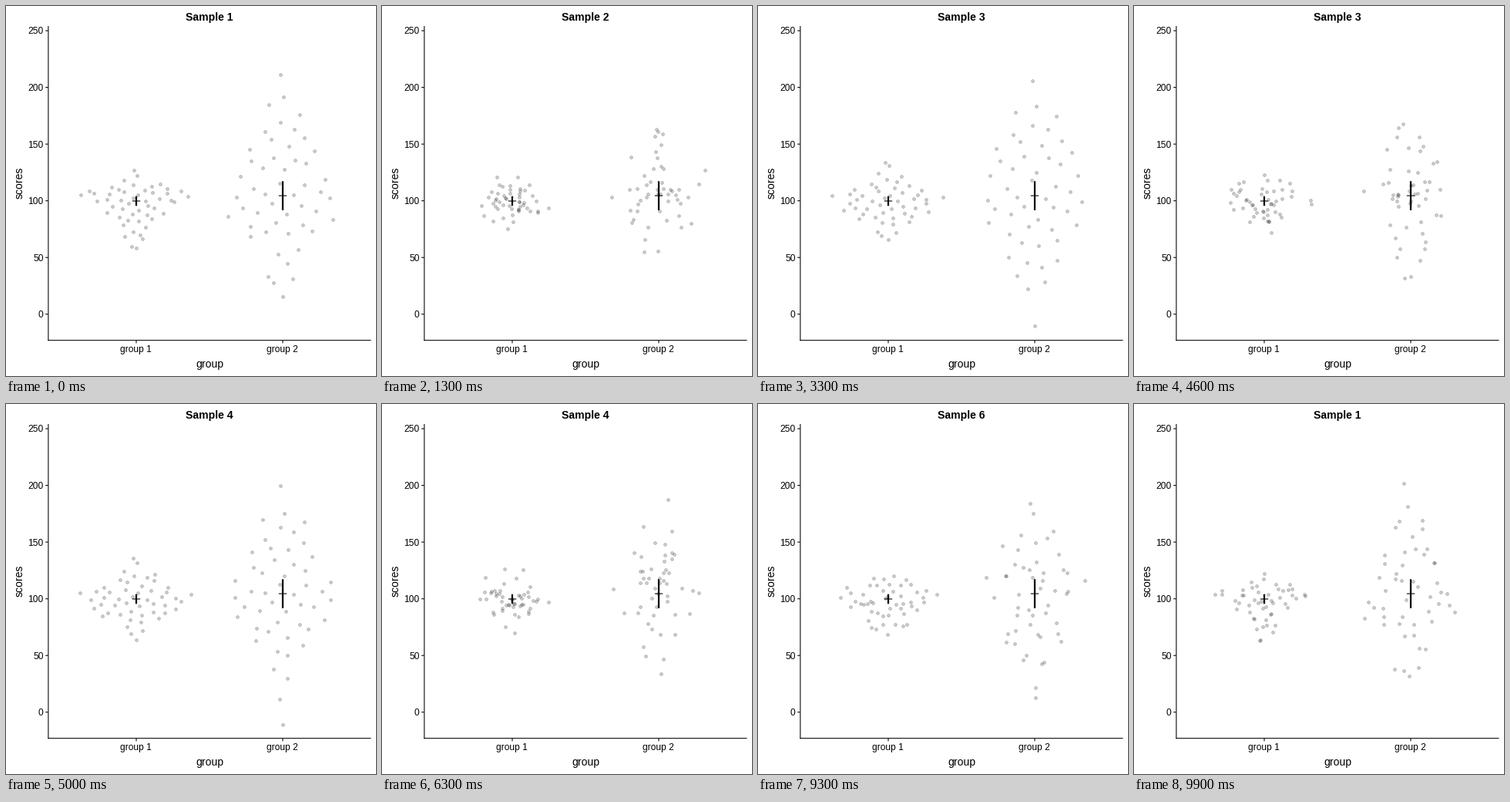
Write a matplotlib script that moves like this. It is 480 px wide and 480 px high and loops after 10000 ms.

```python
import numpy as np
import matplotlib.pyplot as plt
from matplotlib.animation import FuncAnimation

SIZE, DPI = 480, 80
PT = 72 / DPI                      # points per pixel
N, FRAMES, STEPS = 50, 100, 8
STARTS = [9, 26, 43, 60, 77, 93]   # first moving frame of each transition
CENTERS, MEANS, SDS = [169, 359], [99.8, 104.5], [15, 45]
HALF_WIDTH = 76

# Lowest and highest score of group 1 and group 2 in each sample.
ENDS = [
    [(58, 127), (15.7, 211)],
    [(73, 137), (30, 202)],
    [(66, 134), (-10, 206)],
    [(64, 136), (-10.7, 200)],
    [(61, 128), (34, 225)],
    [(64, 124), (2.3, 195)],
]

plt.rcParams["font.family"] = "Liberation Sans"
rng = np.random.default_rng(12)


def to_y(score):
    return 399.8 - 1.471 * score


def draw_scores(mean, low, high):
    """Sorted, roughly normal scores that run from low to high."""
    z = np.sort(rng.normal(size=(3, N)), axis=1).mean(axis=0)
    z -= z.mean()
    return mean + np.where(z < 0, z / z[0] * (low - mean),
                           z / z[-1] * (high - mean))


def van_der_corput(i):
    value, part = 0.0, 0.5
    while i:
        value += part * (i & 1)
        i >>= 1
        part /= 2
    return value


SPREAD = np.array([2 * van_der_corput(i) - 1 for i in range(1, N + 1)])


def density(at, scores):
    q1, q3 = np.percentile(scores, [25, 75])
    width = 0.45 * min(scores.std(ddof=1), (q3 - q1) / 1.34) * N ** -0.2
    return np.exp(-((at[:, None] - scores) / width) ** 2 / 2).sum(axis=1)


def swarm(scores, center):
    """Quasirandom dots: sideways spread follows rank and local density."""
    peak = density(np.linspace(scores[0], scores[-1], 400), scores).max()
    x = center + SPREAD * HALF_WIDTH * density(scores, scores) / peak
    return rng.permutation(np.column_stack([x, to_y(scores)]))


states = [np.vstack([swarm(draw_scores(mean, *ends), center)
                     for mean, ends, center in zip(MEANS, pair, CENTERS)])
          for pair in ENDS]

fig = plt.figure(figsize=(SIZE / DPI, SIZE / DPI), dpi=DPI, facecolor="white")
ax = fig.add_axes([0, 0, 1, 1])
ax.set_xlim(0, SIZE)
ax.set_ylim(SIZE, 0)
ax.axis("off")


def line(xs, ys, width=1.07, z=1):
    ax.plot(xs, ys, color="black", lw=width * PT, zorder=z, snap=False,
            solid_capstyle="butt")


def label(x, y, text, size, ha="center", **kw):
    return ax.text(x, y, text, fontsize=size * PT, ha=ha, va="baseline",
                   color="black", **kw)


line([54.9, 54.9], [26, 434.2])
line([54.4, 473.5], [433.7, 433.7])
for score in range(0, 251, 50):
    y = to_y(score)
    line([51.2, 54.9], [y, y])
    label(48.5, y + 4.4, str(score), 12, ha="right")
for i, x in enumerate(CENTERS, 1):
    line([x, x], [433.7, 437.4])
    label(x - 0.3, 449, f"group {i}", 12)
label(264, 469, "group", 14)
label(21.3, 229.5, "scores", 14, rotation=90, rotation_mode="anchor")
title = label(264, 19, "Sample 1", 14, weight="bold")

dots = ax.scatter(*states[0].T, s=(3.9 * PT) ** 2, facecolor=(0, 0, 0, 0.2),
                  edgecolor=(0, 0, 0, 0.24), linewidth=0.7 * PT, zorder=2)

# Mean with its 95% confidence interval.
for x, mean, sd in zip(CENTERS, MEANS, SDS):
    reach = 2.01 * sd / N ** 0.5
    line([x, x], [to_y(mean - reach), to_y(mean + reach)], 2.2, 3)
    line([x - 5.2, x + 5.2], [to_y(mean)] * 2, 1.07, 3)


def update(frame):
    begun = sum(s <= frame for s in STARTS)
    step = min(frame - STARTS[begun - 1] + 1, STEPS) if begun else STEPS
    old, new = (begun - 1) % 6, begun % 6
    t = step / STEPS
    dots.set_offsets((1 - t) * states[old] + t * states[new])
    title.set_text(f"Sample {(new if t > 0.5 else old) + 1}")
    return dots, title


anim = FuncAnimation(fig, update, frames=FRAMES, interval=100, repeat=True,
                     repeat_delay=0, blit=False)
plt.show()
```
